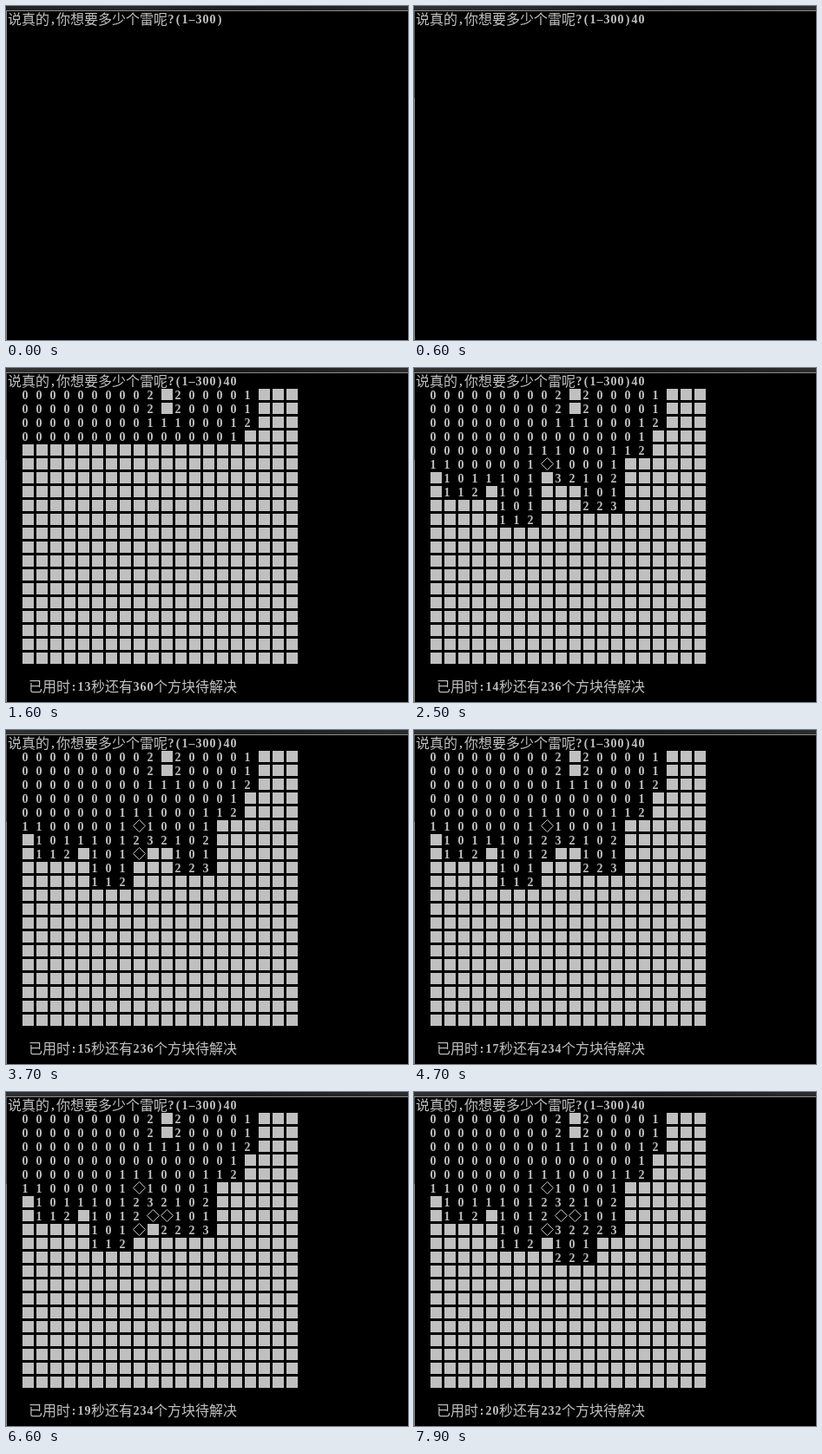
Recreate the animation shown at these times as an HTML page with a canvas. Size 463x385 px, loop 8000 ms.

```html
<!DOCTYPE html>
<html lang="zh">
<head>
<meta charset="utf-8">
<title>扫雷</title>
<style>
  html, body { margin: 0; height: 100%; overflow: hidden; background: #000; }
  canvas { display: block; }
</style>
</head>
<body>
<canvas id="stage" width="463" height="385"></canvas>
<script>
const ctx = document.getElementById('stage').getContext('2d');
const LOOP = 8000, SIZE = 20, PITCH = 16, LEFT = 18, TOP = 23;
const GREY = '#c0c0c0';

// '#' is a closed cell, 'f' a flag, a digit an opened cell.
const firstOpening = [
  '0000000002#200001###',
  '0000000002#200001###',
  '00000000011100012###',
  '0000000000000001####',
  '0000000111000112####',
  '11000001#10001######',
  '#1011101#32102######',
  '#112#101###101######',
  '#####101###223######',
  '#####112############',
];

// [time, row, column, new content]
const moves = [
  [2500, 5, 8, 'f'],
  [2800, 6, 8, '2'],
  [3700, 7, 8, 'f'],
  [4100, 7, 8, '#'],
  [4400, 7, 8, '2'],
  [5000, 8, 8, 'f'],
  [5600, 7, 9, 'f'],
  [6200, 7, 10, 'f'],
  [6500, 8, 10, '2'],
  [7400, 8, 9, '3'],
  [7700, 9, 9, '1'],
  [7900, 9, 10, '01'],
  [7900, 10, 9, '222'],
];

// [time, seconds used, cells left]
const statuses = [
  [900, 13, 360], [1800, 14, 236], [2900, 15, 236], [3800, 16, 235],
  [4700, 17, 234], [5700, 18, 234], [6600, 19, 234], [7400, 20, 232],
];

const rowOpensAt = row => row < 4 ? 1600 : row < 7 ? 1700 : 1800;

function boardAt(t) {
  const board = Array.from({ length: SIZE }, (_, row) =>
    [...(t >= rowOpensAt(row) && firstOpening[row] || '#'.repeat(SIZE))]);
  for (const [time, row, col, content] of moves)
    if (t >= time) board[row].splice(col, content.length, ...content);
  return board;
}

// Console text: 8 px per ASCII character, 16 px per Chinese one.
function print(text, x, baseline) {
  ctx.fillStyle = GREY;
  ctx.textAlign = 'center';
  for (const char of text) {
    const wide = char > '\u3000';
    const width = wide ? 16 : 8;
    ctx.font = wide ? '300 16px "Noto Sans CJK SC", "Noto Sans CJK", sans-serif'
                    : 'bold 14px "Liberation Serif", serif';
    ctx.fillText(char, x + width / 2, baseline + (wide ? 1 : 0));
    x += width;
  }
}

function box(x, y, w, h, color) {
  ctx.fillStyle = color;
  ctx.fillRect(x, y, w, h);
}

function drawFlag(x, y) {
  ctx.strokeStyle = GREY;
  ctx.beginPath();
  for (const [dx, dy] of [[0, -7], [7, 0], [0, 7], [-7, 0]])
    ctx.lineTo(x + 7.5 + dx, y + 7.5 + dy);
  ctx.closePath();
  ctx.stroke();
}

function drawWindow(t) {
  box(0, 0, 463, 385, '#000');
  const bar = ctx.createLinearGradient(0, 0, 463, 0);
  bar.addColorStop(0, t < 200 ? '#222' : '#303030');
  bar.addColorStop(0.3, '#2a2a2a');
  bar.addColorStop(0.6, '#1c1c1c');
  bar.addColorStop(1, '#2c2c2c');
  box(0, 0, 463, 5, bar);
  box(0, 5, 463, 1, '#8c8c8c');
  box(0, 6, 1, 379, '#8c8c8c');
  if (t >= 200) box(0, 6, 1, 100, '#555');
}

function drawBoard(t) {
  boardAt(t).forEach((cells, row) => cells.forEach((cell, col) => {
    const x = LEFT + col * PITCH, y = TOP + row * PITCH;
    if (cell === '#') box(x + 1, y + 1, 13, 13, GREY);
    else if (cell === 'f') drawFlag(x, y);
    else print(cell, x, y + 13);
  }));
}

function draw(t) {
  drawWindow(t);
  print('说真的,你想要多少个雷呢?(1–300)' + (t < 600 ? '' : '40'), 2, 20);
  if (t >= 900) {
    drawBoard(t);
    const [, seconds, left] = statuses.filter(s => t >= s[0]).pop();
    print(`已用时:${seconds}秒还有${left}个方块待解决`, 26, 372);
  }
  if (t >= 3500 && t < 3700) box(162, 132, 8, 3, GREY); // text cursor
}

function tick() {
  draw(performance.now() % LOOP);
  requestAnimationFrame(tick);
}
tick();
</script>
</body>
</html>
```
